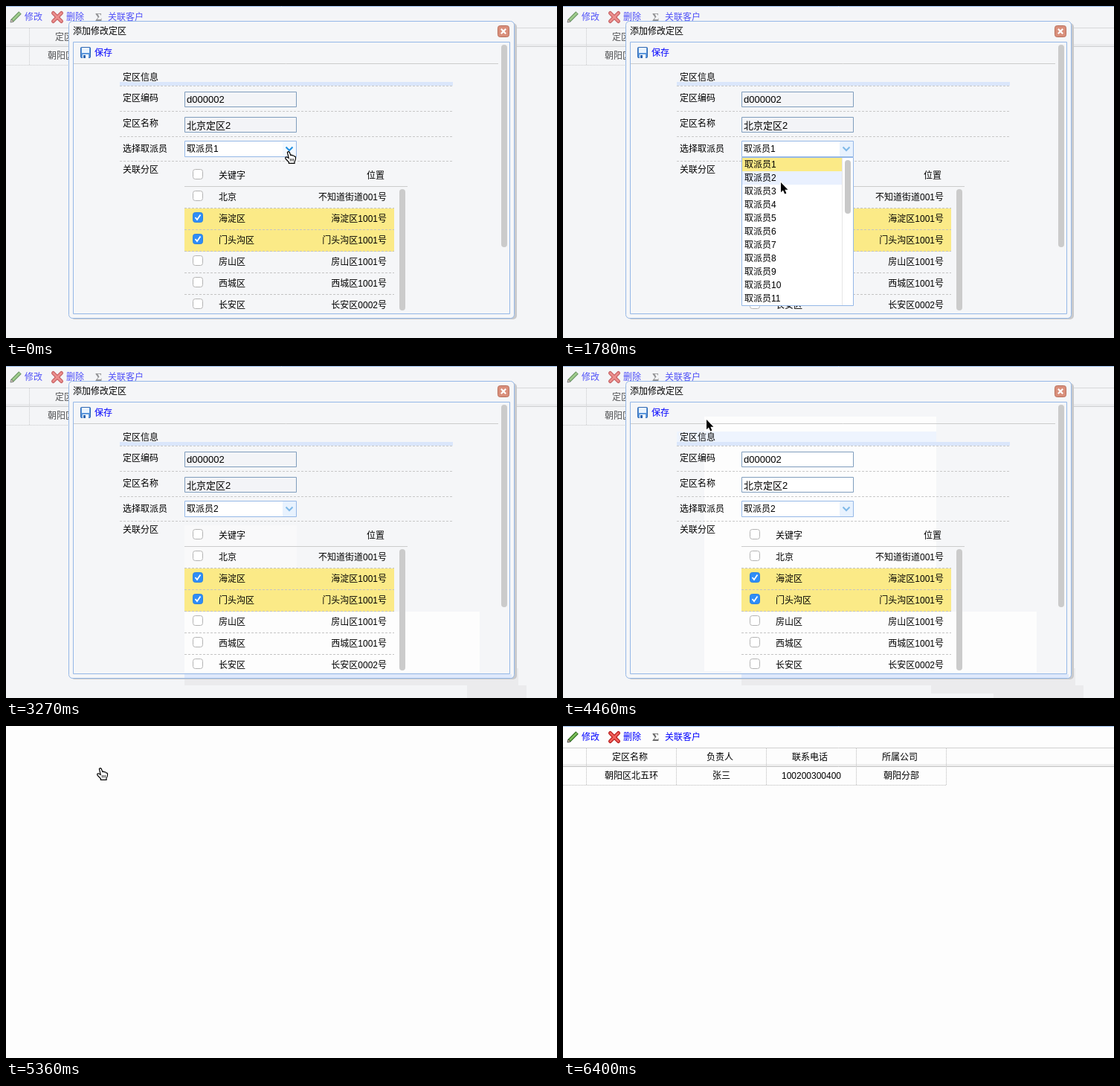
An HTML page with a canvas for the animation above (7.55 s loop, 741 by 446 pixels).

```html
<!DOCTYPE html>
<html lang="zh">
<head>
<meta charset="utf-8">
<style>
html, body { margin: 0; width: 741px; height: 446px; overflow: hidden; background: #fdfdfd; }
canvas { display: block; }
</style>
</head>
<body>
<canvas id="stage" width="741" height="446"></canvas>
<script>
const ctx = document.getElementById('stage').getContext('2d');
const LOOP = 7550;
const FONT = '"Liberation Sans", "Noto Sans CJK SC", "Noto Sans CJK", sans-serif';
const EDGE = '#95b8e7', GREY = '#cbcbcb', PANEL = '#f5f6f8', WHITE = '#fdfdfd', YELLOW = '#fbea87';

// Pointer poses: time, tip x, tip y, shape
const POINTER = [
  [0, 380, 196, 'hand'], [450, 381, 199, 'arrow'], [600, 368, 216, 'arrow'], [745, 346, 231, 'arrow'],
  [890, 325, 246, 'arrow'], [1040, 309, 255, 'arrow'], [1185, 299, 250, 'arrow'], [1335, 295, 243, 'arrow'],
  [1480, 293, 237, 'arrow'], [2380, 318, 248, 'arrow'], [2530, 380, 280, 'arrow'], [2680, 460, 322, 'arrow'],
  [2830, 540, 360, 'arrow'], [2980, 615, 398, 'arrow'], [3130, 676, 428, 'arrow'], [3270, 0, 0, ''],
  [4020, 645, 427, 'arrow'], [4170, 500, 400, 'arrow'], [4310, 340, 220, 'arrow'], [4460, 193, 72, 'arrow'],
  [4610, 156, 66, 'arrow'], [4760, 138, 62, 'hand'], [4910, 131, 59, 'hand'], [5060, 127, 57, 'hand'],
  [5660, 126, 55, 'arrow'], [5950, 141, 72, 'arrow'], [6100, 229, 158, 'arrow'], [6250, 726, 378, 'arrow'],
  [6400, 0, 0, '']
];
const ROWS = [
  ['北京', '不知道街道001号'], ['海淀区', '海淀区1001号', true], ['门头沟区', '门头沟区1001号', true],
  ['房山区', '房山区1001号'], ['西城区', '西城区1001号'], ['长安区', '长安区0002号']
];

function box(x, y, w, h, fill) {
  ctx.fillStyle = fill;
  ctx.fillRect(x, y, w, h);
}
function rounded(x, y, w, h, r, fill, stroke) {
  ctx.beginPath();
  ctx.roundRect(x, y, w, h, r);
  if (fill) { ctx.fillStyle = fill; ctx.fill(); }
  if (stroke) { ctx.strokeStyle = stroke; ctx.lineWidth = 1; ctx.stroke(); }
}
function frame(x, y, w, h, fill, stroke) {
  rounded(x + .5, y + .5, w - 1, h - 1, 0, fill, stroke);
}
function line(x1, y1, x2, y2, color, dash = [], width = 1) {
  ctx.setLineDash(dash);
  ctx.strokeStyle = color;
  ctx.lineWidth = width;
  ctx.beginPath();
  ctx.moveTo(x1, y1);
  ctx.lineTo(x2, y2);
  ctx.stroke();
  ctx.setLineDash([]);
}
const hline = (x1, x2, y, color = '#ccc', dash) => line(x1, y + .5, x2, y + .5, color, dash);
const vline = (x, y1, y2, color = '#ccc', dash) => line(x + .5, y1, x + .5, y2, color, dash);
function text(s, x, baseline, color = '#000', size = 12, align = 'left') {
  ctx.font = `${size}px ${FONT}`;
  ctx.textAlign = align;
  ctx.fillStyle = color;
  ctx.fillText(s, x, baseline);
}
function polyline(points, color, width, close, fill) {
  ctx.beginPath();
  points.forEach(([x, y]) => ctx.lineTo(x, y));
  if (close) ctx.closePath();
  if (fill) { ctx.fillStyle = fill; ctx.fill(); }
  ctx.strokeStyle = color;
  ctx.lineWidth = width;
  ctx.stroke();
}
function cross(x, y, r, color, width) {
  line(x - r, y - r, x + r, y + r, color, [], width);
  line(x - r, y + r, x + r, y - r, color, [], width);
}

function drawPage() {
  box(0, 0, 741, 446, WHITE);
  hline(0, 741, 0, EDGE);
  line(8, 20, 19, 9, '#2c6a1c', [], 5);
  line(9, 19, 18.5, 9.5, '#7cc05a', [], 2.5);
  polyline([[6, 22], [7, 18], [10, 21]], '#444', 1, true, '#e8d9a8');
  ctx.lineCap = 'round';
  cross(69, 15, 5.5, '#b81c1c', 5);
  cross(69, 15, 5.5, '#f0605a', 2.5);
  ctx.lineCap = 'butt';
  ctx.font = 'bold 14px "Liberation Serif", serif';
  ctx.textAlign = 'left';
  ctx.fillStyle = '#666';
  ctx.fillText('Σ', 120, 20);
  text('修改', 25, 19, '#00f');
  text('删除', 81, 19, '#00f');
  text('关联客户', 137, 19, '#00f');

  hline(0, 741, 29, '#d0d0d0');
  box(0, 51, 741, 3, '#eee');
  hline(0, 741, 54, '#c4c4c4');
  for (let x = 31; x < 520; x += 121) vline(x, 30, 80, '#bbb', [1, 1]);
  hline(0, 516, 79, '#bbb', [1, 1]);
  ['定区名称', '负责人', '联系电话', '所属公司'].forEach((s, i) => text(s, 90 + i * 121, 46, '#000', 12, 'center'));
  ['朝阳区北五环', '张三', '100200300400', '朝阳分部'].forEach((s, i) => text(s, 92 + i * 121, 71, '#000', 12, 'center'));
}

function drawMask(t) {
  box(0, 1, 741, 445, 'rgba(226,229,235,.35)');
  if (t >= 2980) {
    box(240, 406, 449, 23, '#ebebed');
    box(620, 429, 80, 17, '#ebebed');
  }
  if (t >= 4020) {
    box(495, 429, 195, 11, '#ebebed');
    box(579, 440, 121, 6, '#ebebed');
  }
}

function drawCheckbox(cy, on) {
  rounded(251.5, cy - 6.5, 13, 13, 3, on ? '#2f8df6' : '#fff', on ? '#2a80e4' : '#b4b4b4');
  if (on) polyline([[254.5, cy], [257, cy + 3], [261.5, cy - 3.5]], '#fff', 1.8);
}

function drawGrid() {
  drawCheckbox(226);
  text('关键字', 286, 232);
  text('位置', 509, 232, '#000', 12, 'right');
  hline(240, 540, 242);
  ROWS.forEach(([name, place, on], i) => {
    const y = 243 + i * 29;
    if (on) box(240, y, 282, 29, YELLOW);
    if (i < 5) hline(240, 522, y + 28, '#c4c4c4', [3, 2]);
    drawCheckbox(y + 12, on);
    text(name, 286, y + 18);
    text(place, 512, y + 18, '#000', 12, 'right');
  });
  rounded(529, 246, 8, 163, 4, GREY);
}

function drawDialog(t, courier, pointer) {
  rounded(87, 23, 600, 398, 5, '#c9cacc');
  rounded(84.5, 20.5, 599, 399, 5, PANEL, EDGE);
  if (t >= 2980) box(240, 414, 440, 5, '#dfe9fb');
  frame(90, 48, 588, 366, PANEL, EDGE);
  text('添加修改定区', 90, 38);
  rounded(661.5, 26.5, 15, 15, 3, '#d98f7b', '#b9705c');
  cross(669, 34, 3.2, '#fff', 2.2);

  // Areas repainted as the pointer crosses the form
  if (t >= 1930) box(240, 214, 151, 116, '#f9f9fa');
  if (t >= 2830) box(240, 330, 397, 82, WHITE);
  if (t >= 4460) {
    box(190, 68, 312, 342, WHITE);
    box(153, 88, 349, 14, '#eef4fe');
  }

  hline(91, 662, 77);
  const [, px, py, shape] = pointer;
  if (t > 4000 && shape && px < 149 && py < 76) rounded(93.5, 50.5, 54, 24, 4, '#eaf2ff', '#b7d2ff');
  rounded(100.5, 55.5, 13, 14, 1, '#5a96dc', '#2f66b0');
  box(102, 56, 10, 7, '#eaf3fe');
  box(103, 65, 8, 5, '#fff');
  box(104, 66, 3, 4, '#2f66b0');
  text('保存', 119, 67, '#00f');
  rounded(666, 52, 8, 272, 4, GREY);

  text('定区信息', 157, 100);
  box(153, 102, 448, 5, '#dae6fb');
  for (const y of [107, 141, 175, 208]) {
    hline(153, 235, y, '#c8c8c8', [3, 2]);
    hline(237, 601, y, '#c8c8c8', [3, 2]);
  }
  text('定区编码', 157, 128);
  text('定区名称', 157, 162);
  text('选择取派员', 157, 196);
  text('关联分区', 157, 224);

  const field = t >= 4460 ? '#fff' : '#f3f4f7';
  frame(240, 115, 151, 21, field, '#7f9dbd');
  frame(240, 149, 151, 21, field, '#7f9dbd');
  text('d000002', 243, 130, '#000', 13);
  text('北京定区2', 243, 165, '#000', 13);

  const hot = t < 600;
  frame(240, 181, 151, 22, '#fff', EDGE);
  box(372, 182, 18, 20, hot ? '#f4f9ff' : '#e8f2fe');
  polyline([[376.5, 189.5], [381, 194], [385.5, 189.5]], hot ? '#1f8fe0' : '#7fb9e8', 2);
  text('取派员' + courier, 243, 196);
  drawGrid();
}

function drawList([, px, py]) {
  frame(240, 203, 151, 200, '#fff', EDGE);
  const hover = px < 375 ? Math.floor((py - 204) / 18) : -1;
  for (let i = 0; i < 11; i++) {
    const y = 204 + i * 18;
    if (i === 0 || i === hover) box(241, y, 134, 18, i ? '#e9f0fe' : YELLOW);
    text('取派员' + (i + 1), 244, y + 13);
  }
  vline(375, 204, 402, '#e6e6e6');
  rounded(379, 207, 8, 72, 4, '#c8c8c8');
}

const ARROW = new Path2D('M0 0V13.2L3 10.5L5.2 15.4L7.4 14.5L5.3 9.7H9.4Z');
const HAND = new Path2D('M-1.6 .6Q0-1.4 1.3 .6L2.8 4.6Q4.2 3.6 5 5Q6.6 4.2 7.4 5.8Q9.6 5.6 9.6 8Q9.4 11 8 13V15.4H.4V13.8L-4 9.2Q-5 6.8-2.6 6.8L.2 8.4Z');
const CREASES = new Path2D('M2.4 9V12.4M4.4 9V12.4M6.4 9V12.4');

function drawPointer([, x, y, shape]) {
  if (!shape) return;
  const arrow = shape === 'arrow';
  ctx.save();
  ctx.translate(x, y);
  ctx.lineWidth = arrow ? 2 : 1.2;
  ctx.strokeStyle = arrow ? '#fff' : '#000';
  ctx.fillStyle = arrow ? '#000' : '#fff';
  if (arrow) {
    ctx.stroke(ARROW);
    ctx.fill(ARROW);
  } else {
    ctx.fill(HAND);
    ctx.stroke(HAND);
    ctx.lineWidth = .8;
    ctx.stroke(CREASES);
  }
  ctx.restore();
}

function draw(now) {
  const t = now % LOOP;
  const pointer = POINTER.findLast(p => p[0] <= t);
  if (t >= 5360 && t < 5660) {
    box(0, 0, 741, 446, WHITE);
  } else {
    drawPage();
    if (t < 5360) {
      drawMask(t);
      drawDialog(t, t < 1930 ? 1 : 2, pointer);
      if (t >= 150 && t < 1930) drawList(pointer);
    }
  }
  drawPointer(pointer);
}

const start = performance.now();
function tick() {
  draw(performance.now() - start);
  requestAnimationFrame(tick);
}
tick();
</script>
</body>
</html>
```
